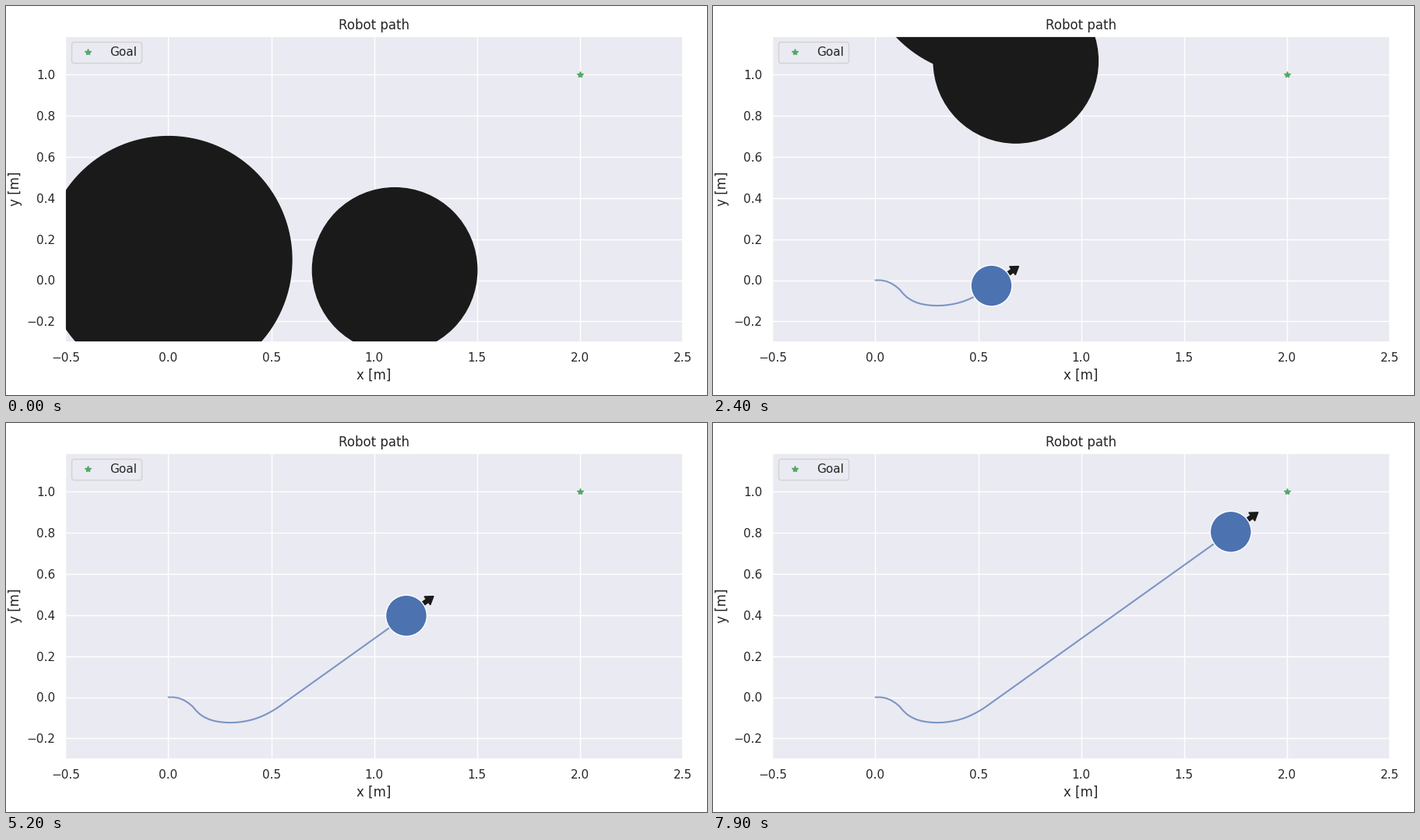
Write a matplotlib script that moves like this. It is 900 by 500 pixels and loops after 8000 ms.

```python
import numpy as np
import matplotlib.pyplot as plt
from matplotlib.animation import FuncAnimation
from matplotlib.patches import Circle, FancyArrow

W, H, DPI = 900, 500, 100
FRAMES, INTERVAL = 80, 100
INK, BLUE, GREEN, BLACK = "0.15", "#4C72B0", "#55A868", "0.1"
GOAL = np.array([2.0, 1.0])

plt.rcParams.update({
    "font.family": "DejaVu Sans", "font.size": 12,
    "axes.titlesize": 12, "axes.labelsize": 12,
    "xtick.labelsize": 11, "ytick.labelsize": 11, "legend.fontsize": 11,
    "text.color": INK, "axes.labelcolor": INK,
    "xtick.color": INK, "ytick.color": INK,
    "axes.facecolor": "#EAEAF2", "axes.edgecolor": "white",
    "axes.linewidth": 1.25, "axes.axisbelow": True,
    "axes.grid": True, "grid.color": "white", "grid.linewidth": 1,
    "xtick.bottom": False, "ytick.left": False,
    "xtick.major.size": 6, "ytick.major.size": 6,
    "lines.solid_capstyle": "round",
})

# Robot: constant speed; it dodges the obstacles, then heads for the goal
STEP = 0.026
DODGE = [0, -10, -22, -32, -40, -50, -44, -33, -25, -17, -10, -6,
         -2, 2, 6, 9, 13, 17, 21, 25, 28, 31, 34, 36]


def drive():
    pos, points, headings = np.zeros(2), [], []
    for n in range(FRAMES):
        dx, dy = GOAL - pos
        angle = np.radians(DODGE[n]) if n < len(DODGE) else np.arctan2(dy, dx)
        points.append(pos)
        headings.append(angle)
        pos = pos + STEP * np.array([np.cos(angle), np.sin(angle)])
    return np.array(points), headings


path, headings = drive()

# Obstacles: start, velocity, acceleration (per second), radius
OBSTACLES = [
    ((0.0, 0.1), (0.2, 0.6), (0.02, 0.02), 0.6),
    ((1.1, 0.05), (-0.15, 0.4), (-0.02, 0.02), 0.4),
]

fig = plt.figure(figsize=(W / DPI, H / DPI), dpi=DPI, facecolor="white")
left, right, top, bottom = 76.4, 868.9, 38.5, 431.75
ax = fig.add_axes([left / W, 1 - bottom / H, (right - left) / W, (bottom - top) / H])
scale = (right - left) / 3
ax.set_xlim(-0.5, 2.5)
ax.set_ylim(-0.3, -0.3 + (bottom - top) / scale)
ax.set_xticks(np.arange(-0.5, 2.6, 0.5))
ax.set_yticks(np.arange(-1, 6) * 0.2)
ax.set_title("Robot path")
ax.set_xlabel("x [m]")
ax.set_ylabel("y [m]")

ax.plot(*GOAL, "*", color=GREEN, label="Goal")
ax.legend(loc="upper left", facecolor="#EAEAF2", edgecolor="0.8", framealpha=0.8)

trail, = ax.plot([], [], color=BLUE, lw=1.5, alpha=0.7, zorder=0.9)
arrow = ax.add_patch(FancyArrow(
    0, 0, 0.163, 0, width=0.019, head_width=0.05, head_length=0.0375,
    length_includes_head=True, color=BLACK, lw=1))
robot = ax.add_patch(Circle((0, 0), 0.1, facecolor=BLUE, edgecolor="white", lw=1))
discs = [ax.add_patch(Circle(start, radius, color=BLACK, lw=1))
         for start, _, _, radius in OBSTACLES]


def update(n):
    x, y = path[n]
    angle = headings[n]
    trail.set_data(path[:n + 1, 0], path[:n + 1, 1])
    robot.center = x, y
    arrow.set_data(x=x, y=y, dx=0.163 * np.cos(angle), dy=0.163 * np.sin(angle))
    t = n * INTERVAL / 1000
    for disc, (start, vel, acc, _) in zip(discs, OBSTACLES):
        disc.center = tuple(np.array(start) + np.array(vel) * t
                            + np.array(acc) * t * t / 2)
    return [trail, robot, arrow, *discs]


anim = FuncAnimation(fig, update, frames=FRAMES, interval=INTERVAL,
                     repeat=True, repeat_delay=0, blit=False)
plt.show()
```
